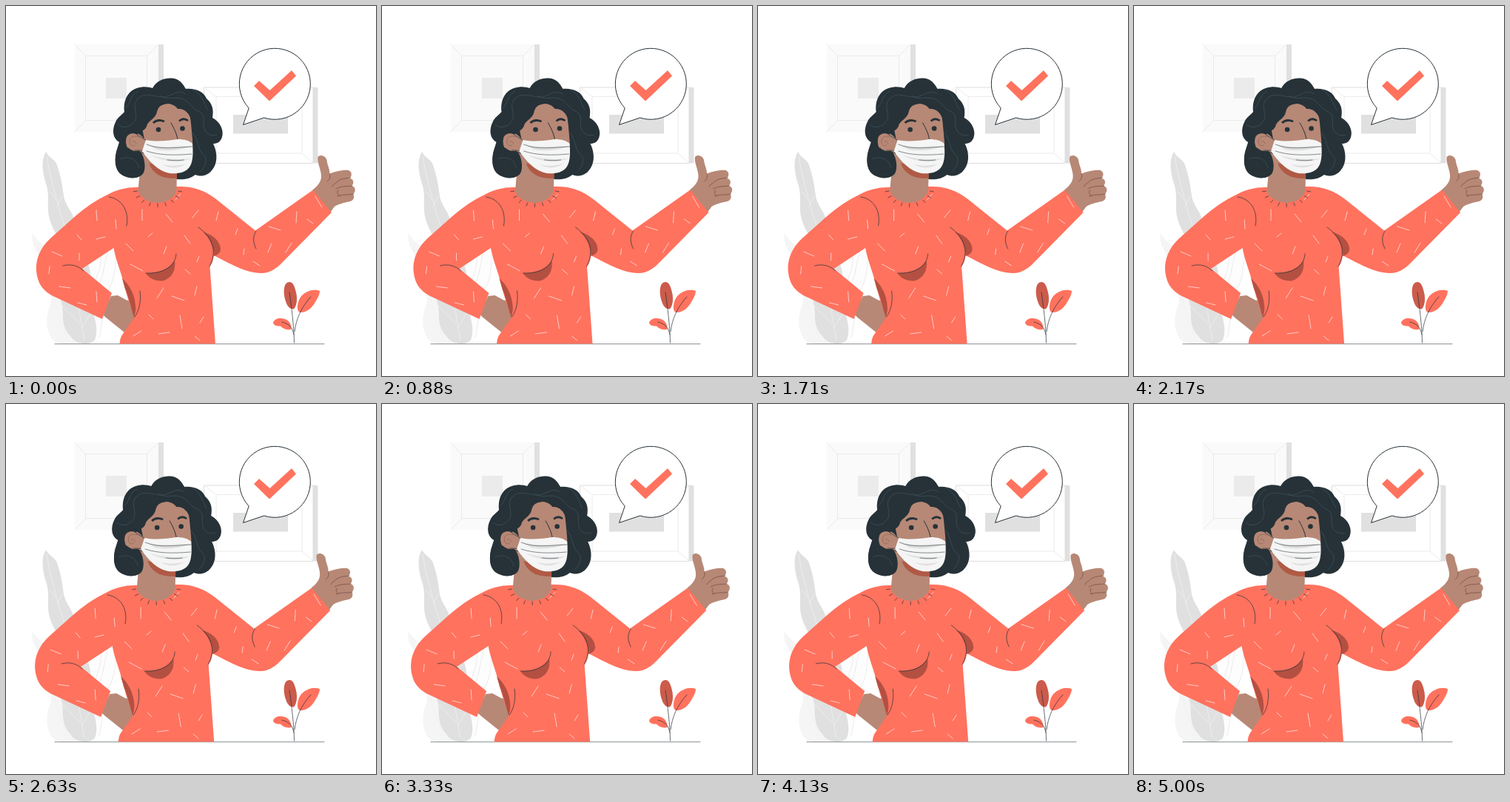
An HTML page that plays this animation: 500x500 px, repeating every 5040 ms.

```html
<!DOCTYPE html>
<html lang="en">
<head>
<meta charset="utf-8">
<title>Thumbs up</title>
<style>
  html, body { margin: 0; width: 100%; height: 100%; overflow: hidden; background: #fff; }
  svg { display: block; width: 100%; height: 100%; }
  .ink { fill: none; stroke: #263238; stroke-width: .7; stroke-linecap: round; stroke-linejoin: round; }
  .pale { fill: none; stroke: #e6e6e6; stroke-width: .8; }
  .skin { fill: #b78876; }
  .hair { fill: #263238; }
  .coral { fill: #ff725e; }
  .shade { fill: #b35042; }
  .strand { fill: none; stroke: #455a64; stroke-width: .6; }
  .dash { fill: none; stroke: #ffe3df; stroke-width: .8; stroke-linecap: round; }
</style>
</head>
<body>
<svg viewBox="0 0 500 500">
  <g id="frames">
    <path d="M206 52h7v118h-7z" fill="#e0e0e0"/>
    <path d="M93 52h113v118H93z" fill="#fafafa"/>
    <path class="pale" d="M107.500 67.500h83v87h-83zM93 52l14.500 15.500M206 52l-15.500 15.500M93 170l14.500-15.500M206 170l-15.500-15.500"/>
    <path d="M135 97h28v28h-28z" fill="#ebebeb"/>
    <path d="M415 110h6.500v102.500H415z" fill="#e0e0e0"/>
    <path d="M267.500 110H415v102.500H267.500z" fill="#fff" stroke="#dedede"/>
    <path class="pale" d="M284 122.500h116V199H284zM268 110l16 12.500M415 110l-15 12.500M268 212l16-13M415 212l-15-13"/>
    <path d="M307 147h74v25.500h-74z" fill="#e0e0e0"/>
  </g>

  <g id="foliage">
    <path d="M36 307C32 326 48 335 50 352C52 372 64 388 60 404C51 424 54 457 78 457H108C116 420 88 372 72 346C60 326 44 322 36 307Z" fill="#f5f5f5"/>
    <path d="M151 322C128 327 109 348 104 378L100 457H124C129 428 132 404 142 380C149 363 144 345 151 322Z" fill="#fdfdfd"/>
    <path class="pale" d="M128 333C131 355 118 370 115 400M150 330C146 352 150 364 138 384C130 402 132 425 126 448M139 327C132 346 133 365 124 380"/>
    <path d="M54 197C47 208 49 225 54 240C60 256 54 272 59 288C63 305 84 330 82 350C78 372 70 385 76 405C78 420 74 432 87 446C94 459 115 459 120 451C125 439 121 425 117 411C110 386 120 365 109 345C100 328 94 314 93 296C93 280 81 272 78 257C76 241 74 230 70 218C68 207 58 206 54 197Z" fill="#e0e0e0"/>
    <path d="M55 203C59 230 70 268 77 290C91 335 94 390 106 452M76 405L100 430M117 411L102 435M60 251l7 10M76 257l-7 14M42 325C57 360 68 410 84 453" fill="none" stroke="#f0f0f0" stroke-width=".8"/>
  </g>

  <path class="ink" d="M66 456.700H430" style="stroke-width:.55"/>

  <g id="plant">
    <path d="M383 373C375 373 374 387 378 399C380 406 384 410 389 409.500C393 405 394 396 392 387C390 379 388 373 383 373Z" fill="#cc5b4b"/>
    <path class="coral" d="M424 385C415 381.500 401 386 396 397C393 405 393 412 397 414C405 415 413 409 418 400C421 395 424 390 424 385Z"/>
    <path class="coral" d="M361 428C363 422 370 421 377 423C383 425 386 431 385.500 437C380 438.500 374 436 371 432.500C367 433 362 432 361 428Z"/>
    <path class="ink" d="M383 387C386 409 389 430 389.500 455M390 440C392 423 399 407 412 393M373 427C384 430 387 435 389 444"/>
  </g>

  <g id="bubble">
    <path d="M328.200 138A48 48 0 1 1 348.700 151L320.500 160.500Z" fill="#fff" stroke="#263238" stroke-linejoin="round"/>
    <path class="coral" d="M335 108l7-7 14.500 13L386 87l6 7.500-36 34z"/>
  </g>

  <g id="person">
    <path class="hair" d="M160 143C158 126 166 111 184 109.500C190 109 194 110 198 111C204 100 215 97 224 97.500C234 98 239 105 243 112C257 111 267 116 271 125C279 132 281 140 279 151C289 156 295 168 292 177C290 184 285 186 280 186C287 200 285 214 279 221C273 230 262 231 256 228C248 234 240 235 230 234L184 227C180 233 168 234 160 230C148 225 146 212 149 199C150 192 152 188 153 184C144 179 143 167 148 157C151 150 156 148 160 143Z"/>

    <path class="skin" d="M142 392L151 391L163 397.500L172 399L176 420L160 441L135 421L130 416Z"/>
    <path class="skin" d="M414 249C421 243 426 238 426 230C426 221 420 211 421.500 204C424 200 432 202 433.500 208C434 215 437.500 219 437.500 226.500C446 223 459 221 463 222C468 224 468 230 464 233C470 233 471 240 467 243C473 244 473 251 469 254C472 259 469 263 465 264C456 266 448 268 444 271L438 279Z"/>
    <path class="ink" d="M466 232C459 233 452 233 447 238C444 241 440 242 441 244M468 243C460 244 453 243 446 247M470 254C462 256 455 254 448 257M449 249C447 252 448 255 451 257M437.500 227C439 231 437 235 434 237" style="stroke:#704a3d"/>

    <path class="coral" d="M178.500 245C164 244.500 150 248 139 254C122 262 106 273 92 285.500L60 314C46 327 40 342 41 358C43 376 50 386 68 394L130 423L143 388L103 355L145.500 327C149 346 156 360 159 375C163 390 168 407 174 420L158 443Q154 448 153.500 456.500H283L275.500 352C279 348 280 343 281 337C301 347 322 360.500 345 361C356 361 363 356 370 350L440 279L415 248.500L337 303.500L284 261C269 249 252 243 231 244Z"/>
    <path class="shade" d="M157 368C168 378 174 391 175 405C176 412 174 417 173 421C169 408 166 393 161 382Z"/>
    <path class="shade" d="M189 361C206 361 219 357 228 344C230 358 223 369 211 371.500C202 372 193 368 189 361Z"/>
    <path class="shade" d="M266 305C278 309 289 316 290 328C290 334 286 336 281 338C281 326 275 313 266 305Z"/>
    <path class="ink" d="M139 258C155 260 167 275 163 297M77 351C88 348 98 351 105 358M338 304C333 312 334 320 338 328M189 361C211 362 229 353 230 335M260 299C274 309 282 322 280 337C279 344 277 348 275 352M181 385C183 399 180 412 174 420"/>
    <path class="dash" d="M122 276l1 14M148 289l1 12M122 315l12-3M96 309l6 7M62 332l14 6M99 334v10M59 352l-1 10M72 379l15 2M97 401l12 3M122 386l1 14"/>
    <path class="dash" d="M184 275v15M162 321l10 10M192 312l6-5M168 349l17 9M216 281l9 11M229 262l7-8M252 286l8-10M241 310l8 11M217 325l-4 10M258 346l3-8M242 356l7 6M258 379l-3 12M204 395l9-14M224 392l17 6M235 418l3 18M206 443l15-2M172 446l11-7M193 417l6 6M262 428l5-8M255 446l7 6"/>
    <path class="dash" d="M287 278l-3 12M313 301l-3 8M355 298l16 5M393 278l-1 15M407 288l8 6M378 333l8-13M354 333l5-12M334 345l9 6M322 328l-1 8M418 257l9 15"/>

    <path class="skin" d="M183 198L178.500 250C181 259 193 266 206 266C219 265 229 258 230.500 249L231 222Z"/>
    <path id="collar" class="ink"/>
    <path d="M193 212C198 227 211 234 231 233V224Z" fill="#b05a45"/>

    <path class="skin" d="M207 136C218 128 237 132 248 145C252 159 253 175 252 195L240 222L204 216L187 198C180 197 170 198 165 193C160 185 162 173 170 172C179 170 184 176 187 180L184 165L190 150Z"/>
    <path class="hair" d="M186 124C200 121 216 124 218 132C210 132 206 136 204 143C203 152 191 155 190 163C187 169 180 170 177 174C169 170 165 176 163 180L153 184V155Z"/>
    <path class="hair" d="M214 132C221 131 229 134 232 139C240 138 247 144 249 151C251 164 251 174 253 187L270 184L266 126L225 118Z"/>
    <path class="hair" d="M150 194C160 188 176 193 182 197C187 204 190 219 185 227C177 235 164 233 156 227C147 220 146 205 150 194Z"/>
    <path class="skin" d="M184 180C177 170 165 170 162.500 179C161 188 166 196 176 196L184 195L190 181Z"/>
    <path class="ink" d="M179 177C172 174 167 178 167 183C168 189 171 190 174 188M171 183C174 182 176 184 176 186" style="stroke:#8a5b4a;stroke-width:.6"/>
    <path class="ink" d="M177 174L190 182M174 195C179 195 182 195 187 196"/>
    <path class="ink" d="M223 158C227 165 231 173 232 181" style="stroke-width:1"/>
    <path d="M199 158C203 154 208 153.500 214 156M234 155.500C238 152 242 152 246 155" fill="none" stroke="#263238" stroke-width="2.800"/>
    <circle class="hair" cx="206" cy="167" r="3.300"/>
    <circle class="hair" cx="238.500" cy="165.500" r="3.300"/>

    <path d="M189 181C205 184 218 182 232 180C241 180 248 182 252 186C253 197 253 209 249 216C244 226 230 227 221 226C206 223 194 211 184 196Z" fill="#f5f5f5"/>
    <path d="M191 186C206 193 230 189 252 189C237 195 218 197 203 194ZM195 201C211 207 230 208 250 206C237 213 211 211 195 201ZM211 214C223 217 234 216 244 213C234 220 221 220 211 214Z" fill="#e0e0e0"/>
    <path class="ink" d="M190 187C207 195 232 191 252 190M190 196C207 202 229 202 251 200M218 208C226 209 233 209 240 208" style="stroke-width:.55"/>

    <path class="strand" d="M151 160C159 167 171 163 175 153C178 144 171 137 176 128C184 115 199 122 210 123C224 124 230 111 243 119M208 121C217 128 228 122 237 125C249 128 250 139 262 143C272 149 263 160 270 170C275 176 282 175 285 174M252 113C266 119 267 132 273 141M252 171C261 181 258 193 267 201C274 207 269 218 262 224M154 207C165 202 177 206 180 219M161 138C170 132 166 121 179 115"/>
  </g>
</svg>
<script>
  const LOOP = 5040, STEP = 500, LEAD = 20;
  const sway = [0, -1, 2, -4, 4, -4, 4, -4, 2, -1, 0];
  const person = document.getElementById('person');

  // Short stitches fanned around the neckline
  const onCollar = (angle, rx, ry) =>
    `${(205 + rx * Math.cos(angle)).toFixed(1)} ${(247 + ry * Math.sin(angle)).toFixed(1)}`;
  let stitches = '';
  for (let i = 0; i < 9; i++) {
    const angle = Math.PI * (0.05 + i * 0.1125);
    stitches += `M${onCollar(angle, 28, 20)}L${onCollar(angle, 33, 24.5)}`;
  }
  document.getElementById('collar').setAttribute('d', stitches);

  // Mostly linear, slightly softened at each turn
  const soften = p => 0.65 * p + 0.35 * p * p * (3 - 2 * p);

  function offsetAt(ms) {
    const position = Math.min((ms + LEAD) / STEP, sway.length - 1);
    const i = Math.min(Math.floor(position), sway.length - 2);
    return sway[i] + (sway[i + 1] - sway[i]) * soften(position - i);
  }

  const start = performance.now();
  function draw(now) {
    const ms = Math.max(0, now - start) % LOOP;
    person.setAttribute('transform', `translate(${offsetAt(ms).toFixed(3)} 0)`);
    requestAnimationFrame(draw);
  }
  draw(start);
</script>
</body>
</html>
```
